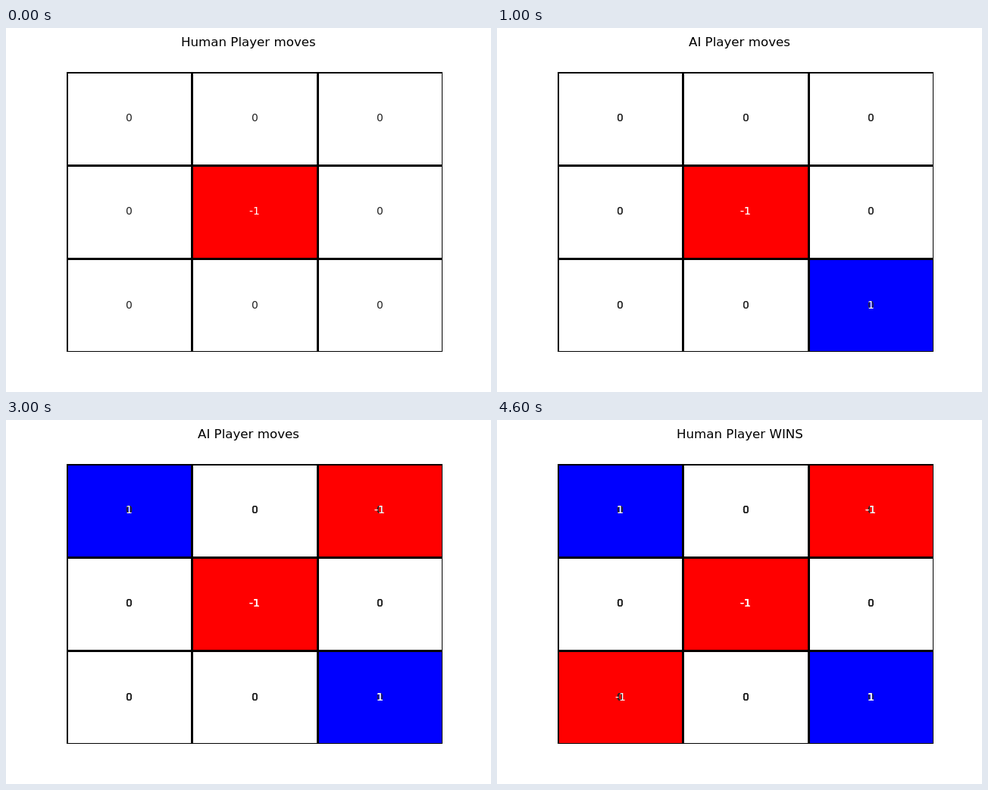
An HTML page with a canvas that plays this animation: 640x480 px, repeating every 5 s.

```html
<!DOCTYPE html>
<html lang="en">
<head>
<meta charset="utf-8">
<title>Tic-tac-toe heatmap</title>
<style>
  html, body { margin: 0; width: 100%; height: 100%; overflow: hidden; background: #fff; }
  canvas { display: block; }
</style>
</head>
<body>
<canvas id="stage" width="640" height="480"></canvas>
<script>
const ctx = document.getElementById('stage').getContext('2d');
const STEP = 1000;
const FONT = '"DejaVu Sans", sans-serif';
const FILL = { '-1': '#f00', 0: '#fff', 1: '#00f' };

// Each move: cell index, value written there, title shown.
const moves = [
  { cell: 4, value: -1, title: 'Human Player moves' },
  { cell: 8, value: 1, title: 'AI Player moves' },
  { cell: 2, value: -1, title: 'Human Player moves' },
  { cell: 0, value: 1, title: 'AI Player moves' },
  { cell: 6, value: -1, title: 'Human Player WINS' }
];

const boards = moves.map((_, last) => {
  const board = Array(9).fill(0);
  moves.slice(0, last + 1).forEach(m => board[m.cell] = m.value);
  return board;
});

const colLines = [79, 244, 410, 575];
const rowLines = [57, 180, 303, 426];
const baselines = [123, 246, 370];

function centerText(text, x, y, size, color) {
  ctx.font = `${size}px ${FONT}`;
  ctx.fillStyle = color;
  ctx.fillText(text, Math.round(x - ctx.measureText(text).width / 2), y);
}

function drawCells(board) {
  ctx.save();
  ctx.beginPath();
  ctx.rect(80, 58, 496, 369);
  ctx.clip();
  board.forEach((value, i) => {
    const c = i % 3, r = Math.floor(i / 3);
    ctx.fillStyle = FILL[value];
    ctx.fillRect(colLines[c], rowLines[r],
      colLines[c + 1] - colLines[c], rowLines[r + 1] - rowLines[r]);
  });
  ctx.fillStyle = '#000';
  colLines.forEach(x => ctx.fillRect(x, 57, 3, 372));
  rowLines.forEach(y => ctx.fillRect(79, y, 499, 3));
  ctx.restore();
}

function drawLabels(board) {
  board.forEach((value, i) => centerText(
    String(value), 80 + 496 * (i % 3 + 0.5) / 3, baselines[Math.floor(i / 3)],
    13.89, value ? '#fff' : '#262626'));
}

function draw(step) {
  ctx.fillStyle = '#fff';
  ctx.fillRect(0, 0, 640, 480);
  drawCells(boards[step]);
  // Labels of earlier moves stay underneath the newer ones.
  boards.slice(0, step + 1).forEach(drawLabels);
  centerText(moves[step].title, 320, 24, 16.67, '#000');
}

const start = performance.now();

function tick() {
  const elapsed = performance.now() - start;
  draw(Math.floor(elapsed / STEP) % moves.length);
  requestAnimationFrame(tick);
}
tick();
</script>
</body>
</html>
```
